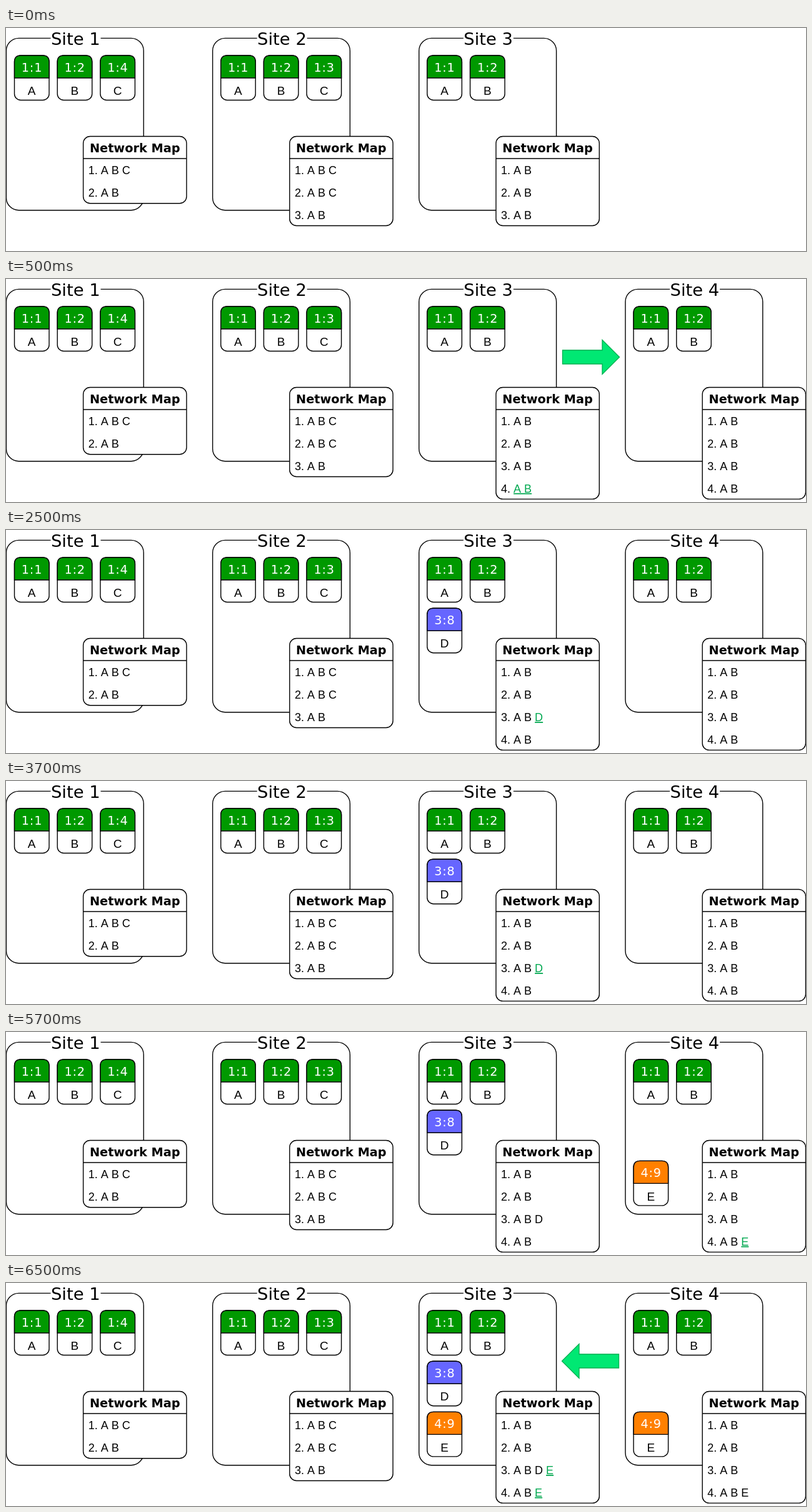
An HTML page that plays this animation: 1280x357 px, repeating every 8 s.

```html
<!DOCTYPE html>
<html lang="en">
<head>
<meta charset="utf-8">
<title>Network map</title>
<style>
  html, body { margin: 0; width: 100%; height: 100%; overflow: hidden; background: #fff; }
  svg { display: block; }
  text { font-family: "DejaVu Sans", Verdana, sans-serif; font-size: 19.3px; white-space: pre; }
  .mid { text-anchor: middle; }
  .title { font-size: 27.4px; }
  .head { font-weight: bold; }
  .id { fill: #fff; letter-spacing: .8px; }
  .label, .row { font-family: "Liberation Sans", Arial, sans-serif; font-kerning: none; }
  .label { font-size: 19px; }
  .row { font-size: 18px; }
  .new { fill: #00a850; text-decoration: underline; }
  .box { fill: #fff; stroke: #000; stroke-width: 1.4; }
  .line { fill: none; stroke: #000; stroke-width: 1.4; }
  .arrow { fill: #00e873; stroke: #00b050; stroke-width: 1.3; }
</style>
</head>
<body>
<svg id="stage" width="1280" height="357" viewBox="0 0 1280 357"></svg>
<script>
const LOOP = 8000;
const STARTS = [0, 500, 2500, 4500, 6500];
const GREEN = '#009900', BLUE = '#6666ff', ORANGE = '#ff8000';

const text = (cls, x, y, s) => `<text class="${cls}" x="${x}" y="${y}">${s}</text>`;
const box = (x, y, w, h, r) =>
  `<rect class="box" x="${x}" y="${y}" width="${w}" height="${h}" rx="${r}"/>`;

// A block is "id label column row".
function block(spec) {
  const [id, label, col, row] = spec.split(' ');
  const fill = { 1: GREEN, 3: BLUE, 4: ORANGE }[id[0]];
  return `<g transform="translate(${13.5 + col * 68.7} ${44 + row * 81.2})">
    ${box(0, 0, 55.5, 71.5, 10)}
    <path class="line" style="fill:${fill}" d="M0 36V10Q0 0 10 0H45.5Q55.5 0 55.5 10V36Z"/>
    ${text('mid id', 28, 25.6, id)}${text('mid label', 27.7, 63.2, label)}</g>`;
}

// Underscores in a row enclose newly added letters.
function networkMap(rows) {
  const lines = rows.map((row, i) => text('row', 131.7, 234.4 + i * 35.8,
    `${i + 1}. ` + row.replace(/_(.+)_/, '<tspan class="new">$1</tspan>')));
  return box(123.6, 173.5, 165.3, 35.5 + rows.length * 35.85, 11) +
    '<path class="line" d="M123.6 209H288.9"/>' +
    text('mid head', 206.2, 198.8, 'Network Map') + lines.join('');
}

function site(n, blocks, rows) {
  return `<g transform="translate(${(n - 1) * 330.2} 0)">
    ${box(.4, 16.4, 219.8, 275.3, 20)}
    <rect x="71.5" y="8" width="80" height="18" fill="#fff"/>
    ${text('mid title', 111.3, 27, 'Site ' + n)}
    ${blocks.map(block).join('')}${networkMap(rows)}</g>`;
}

const arrow = flip => `<path class="arrow" transform="${flip ? 'translate(1871 0) scale(-1 1)' : ''}"
  d="M890.5 114H954V97.5L981.5 125L954 152.5V136H890.5Z"/>`;

function scene(step) {
  const ab = ['1:1 A 0 0', '1:2 B 1 0'];
  const blocks3 = [...ab], blocks4 = [...ab];
  if (step > 1) blocks3.push('3:8 D 0 1');
  if (step > 2) blocks4.push('4:9 E 0 2');
  if (step > 3) blocks3.push('4:9 E 0 2');

  const rows3 = ['A B', 'A B', ['A B', 'A B', 'A B _D_', 'A B D', 'A B D _E_'][step]];
  if (step) rows3.push(['', '_A B_', 'A B', 'A B', 'A B _E_'][step]);
  const last4 = ['', 'A B', 'A B', 'A B _E_', 'A B E'][step];

  return site(1, [...ab, '1:4 C 2 0'], ['A B C', 'A B']) +
    site(2, [...ab, '1:3 C 2 0'], ['A B C', 'A B C', 'A B']) +
    site(3, blocks3, rows3) +
    (step ? site(4, blocks4, ['A B', 'A B', 'A B', last4]) : '') +
    (step === 1 ? arrow(false) : step === 4 ? arrow(true) : '');
}

const stage = document.getElementById('stage');
const begin = performance.now();
let shown = -1;

function tick() {
  const t = (performance.now() - begin) % LOOP;
  const step = STARTS.filter(s => s <= t).length - 1;
  if (step !== shown) stage.innerHTML = scene(shown = step);
  requestAnimationFrame(tick);
}
tick();
</script>
</body>
</html>
```
